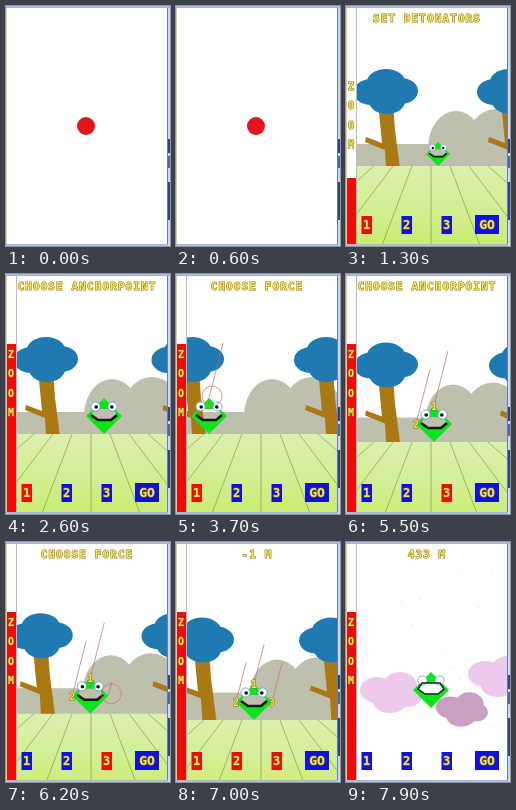
Recreate the animation shown at these times as an HTML page. Size 164 by 240 pixels, loop 8 s.

```html
<!DOCTYPE html>
<html lang="en">
<head>
<meta charset="utf-8">
<title>Detonators</title>
<style>
html, body { margin: 0; width: 100%; height: 100%; overflow: hidden; background: #fff; }
svg { display: block; width: 100vw; height: 100vh; }
text {
  font-family: "DejaVu Sans Mono", "Liberation Mono", monospace;
  font-weight: bold; text-anchor: middle;
  fill: #f8e648; stroke: #7d6d22; stroke-width: 1; paint-order: stroke;
}
.title { font-size: 11px; letter-spacing: 1.1px; }
</style>
</head>
<body>
<svg viewBox="0 0 164 240">
  <defs>
    <linearGradient id="grass" x2="0" y2="1">
      <stop stop-color="#dcf0ae"/><stop offset=".5" stop-color="#d3ee92"/><stop offset="1" stop-color="#c8ec6c"/>
    </linearGradient>
    <clipPath id="view"><rect x="11" y="2" width="150" height="236"/></clipPath>
    <g id="tree">
      <path d="M-8 10H7L9 38L16 92H1L-1 58L-21 50L-20 45L-4 51Z" fill="#aa7914"/>
      <g fill="#1f7ab2">
        <ellipse cx="-15" rx="17" ry="13"/><ellipse cx="15" cy="-1" rx="17" ry="13"/>
        <ellipse cy="-10" rx="19" ry="13"/><ellipse cx="1" cy="9" rx="18" ry="13"/>
      </g>
    </g>
    <g id="cloud">
      <ellipse cx="-13" cy="-2" rx="17" ry="13"/><ellipse cx="10" cy="-6" rx="17" ry="14"/>
      <ellipse cx="18" cy="4" rx="14" ry="11"/><ellipse cy="10" rx="17" ry="11"/>
    </g>
  </defs>
  <g id="stage"></g>
</svg>
<script>
const LOOP = 8000, STEP = 100;
const stage = document.getElementById('stage');
const clamp = v => Math.max(0, Math.min(1, v));
const ramp = (t, a, b) => clamp((t - a) / (b - a));
const mix = (a, b, k) => a + (b - a) * k;

// time, ball x, ground drop, ball radius, left tree, right tree, hill
const camera = [
  [1300, 92, 0, 12, 40, 163, 110],
  [2100, 98, 0, 18, 40, 176, 106],
  [2800, 98, 0, 18, 40, 178, 106],
  [3500, 33, 0, 18, 16, 150, 96],
  [4100, 33, 0, 18, 16, 150, 96],
  [4900, 88, 8, 18, 40, 175, 107],
  [5900, 88, 8, 18, 40, 175, 107],
  [6700, 78, 18, 18, 26, 155, 101]
];
const titles = [
  [800, 'SET DETONATORS'], [2000, 'CHOOSE ANCHORPOINT'], [3100, 'CHOOSE FORCE'],
  [4000, 'SET DETONATORS'], [4300, 'CHOOSE ANCHORPOINT'], [4700, 'CHOOSE FORCE'],
  [5100, 'SET DETONATORS'], [5300, 'CHOOSE ANCHORPOINT'], [6000, 'CHOOSE FORCE'],
  [6500, 'SET DETONATORS']
];
// anchor on the diamond, time placed, time its force appears
const charges = [[0, -1, 2800, 3200], [-1, 0, 4500, 4800], [1, 0, 5700, 6100]];

function cameraAt(t) {
  const i = camera.findIndex(k => k[0] > t);
  if (i === 0) return camera[0].slice(1);
  if (i < 0) return camera[camera.length - 1].slice(1);
  const a = camera[i - 1], b = camera[i], k = ramp(t, a[0], b[0]);
  return a.slice(1).map((v, n) => mix(v, b[n + 1], k));
}

const rect = (x, y, w, h, fill) => `<rect x="${x}" y="${y}" width="${w}" height="${h}" fill="${fill}"/>`;
const ellipse = (x, y, rx, ry, fill) => `<ellipse cx="${x}" cy="${y}" rx="${rx}" ry="${ry}" fill="${fill}"/>`;
const line = (x1, y1, x2, y2, color, w) =>
  `<path d="M${x1} ${y1}L${x2} ${y2}" stroke="${color}" stroke-width="${w}"/>`;
const label = (s, x, y, size) => `<text x="${x}" y="${y}" font-size="${size}">${s}</text>`;
const use = (id, x, y, fill = '') => `<use href="#${id}" x="${x}" y="${y}" fill="${fill}"/>`;

function windowFrame() {
  return rect(0, 0, 164, 2, '#a4b6e4') + rect(0, 2, 1, 238, '#d8d29a') +
    rect(0, 238, 164, 2, '#a9bbdf') + rect(161, 2, 1, 236, '#5f7cc4') +
    rect(162, 2, 2, 238, '#cbd8f3') +
    rect(162, 133, 2, 14, '#2c4380') + rect(162, 150, 2, 12, '#4d66a5') +
    rect(162, 176, 2, 38, '#2c4380');
}

function scenery(drop, left, right, hill) {
  const back = drop * .7, ground = 160 + drop, grey = '#bfbfae';
  let s = ellipse(hill, 142 + back, 28, 37, grey) + ellipse(hill + 40, 142 + back, 31, 39, grey) +
    rect(11, 138 + back, 150, 50, grey) +
    use('tree', left, 86 + back) + use('tree', right, 86 + back) +
    rect(11, ground, 150, 85, 'url(#grass)');
  for (let i = -6; i <= 6; i++)
    s += line(85 + i * 19, ground, 85 + i * 50, ground + 82, '#66854a', .55);
  return s;
}

function sky(fall) {
  let s = '', seed = 7;
  const rand = () => (seed = seed * 16807 % 2147483647) / 2147483647;
  for (let i = 0; i < 26; i++)
    s += ellipse(12 + rand() * 148, 22 + rand() * 180 + fall * .3, .7, .7, '#ead9ec');
  return s + use('cloud', 44, 150 + fall, '#edc9ed') + use('cloud', 152, 134 + fall, '#edc9ed') +
    `<g transform="translate(115 ${167 + fall}) scale(.84)">${use('cloud', 0, 0, '#c9a0c2')}</g>`;
}

// The diamond is open between eyes and mouth, so the backdrop shows through.
function ball(x, y, r, flying) {
  const eye = side => `<circle cx="${side * 8.5}" cy="-9.5" r="4.6" fill="#fff" stroke="#6aa0d4" stroke-width=".9"/>` +
    (flying ? '' : `<circle cx="${side * 7.8}" cy="-9" r="1.8" fill="#111"/>`);
  const gap = 'M-9 -7H9L13 -1L7 4H-6L-13 -1Z';
  const mouth = flying ? gap : 'M-13 -1L-6 4H7L13 -1';
  return `<g transform="translate(${x} ${y}) scale(${r / 18})">` +
    `<path d="M0 -18L18 0L0 18L-18 0Z${gap}" fill="#0be51b" fill-rule="evenodd"/>${eye(-1)}${eye(1)}` +
    `<path d="${mouth}" fill="none" stroke="#1a1a1a" stroke-width="${flying ? 1.5 : 2.6}"/></g>`;
}

function detonators(t, x, y, r) {
  const size = mix(1, .72, ramp(t, 6500, 6800));
  return charges.map(([ax, ay, placed, forced], i) => {
    if (t < placed) return '';
    const px = x + ax * r, py = y + ay * r, k = size * ramp(t, forced, forced + 400);
    let s = k ? line(px, py, px + 14 * k, py - 55 * k, '#b9706a', .7) : '';
    if (t >= forced && t < forced + 700)
      return s + `<circle cx="${px + 3}" cy="${py - 2}" r="10" fill="none" stroke="#cc7a72" stroke-width=".8"/>`;
    return s + label(i + 1, px, py + 4, 10);
  }).join('');
}

function controls(t) {
  const top = mix(172, 70, ramp(t, 1400, 2100)), blue = '#1010e0', red = '#f00a0a';
  const blast = t >= 6800 && t < 7300;
  const active = t < 1200 || t >= 6500 ? -1 : t < 4100 ? 0 : t < 5200 ? 1 : 2;
  let s = rect(1, 2, 9, 236, '#fff') + rect(1, top, 9, 238 - top, red) + rect(10, 2, 1, 236, '#b9bccb');
  [...'ZOOM'].forEach((c, i) => s += label(c, 5, 84 + i * 19.3, 10));
  for (let i = 0; i < 3; i++)
    s += rect(15.5 + i * 40, 210, 10.5, 18, blast || i === active ? red : blue) + label(i + 1, 20.5 + i * 40, 223, 12);
  return s + rect(129, 209, 24, 19, blue) + label('GO', 141, 223, 13);
}

function draw(t) {
  if (t < 800) {
    stage.innerHTML = rect(0, 0, 164, 240, '#fff') + windowFrame() +
      '<circle cx="80" cy="120" r="9" fill="#e5151b"/>';
    return;
  }
  const [x, drop, r, left, right, hill] = cameraAt(t);
  const flight = ramp(t, 7200, 7900);
  const bx = mix(x, 85, flight), by = mix(160 + drop - r, 148, flight);
  const title = t < 6800 ? titles.filter(k => k[0] <= t).pop()[1]
    : Math.round(mix(-1, 433, flight)) + ' M';
  const world = (flight ? sky(-320 * (1 - flight)) : '') +
    `<g transform="translate(0 ${flight * 520})">${scenery(drop, left, right, hill)}</g>` +
    ball(bx, by, r, t >= 7300) + (t < 7300 ? detonators(t, bx, by, r) : '');
  stage.innerHTML = rect(0, 0, 164, 240, '#fff') + `<g clip-path="url(#view)">${world}</g>` +
    windowFrame() + controls(t) + `<text class="title" x="81" y="16">${title}</text>`;
}

let start, shown;
function tick(now) {
  start ??= now;
  const t = Math.floor((now - start) % LOOP / STEP) * STEP;
  if (t !== shown) draw(shown = t);
  requestAnimationFrame(tick);
}
draw(0);
requestAnimationFrame(tick);
</script>
</body>
</html>
```
